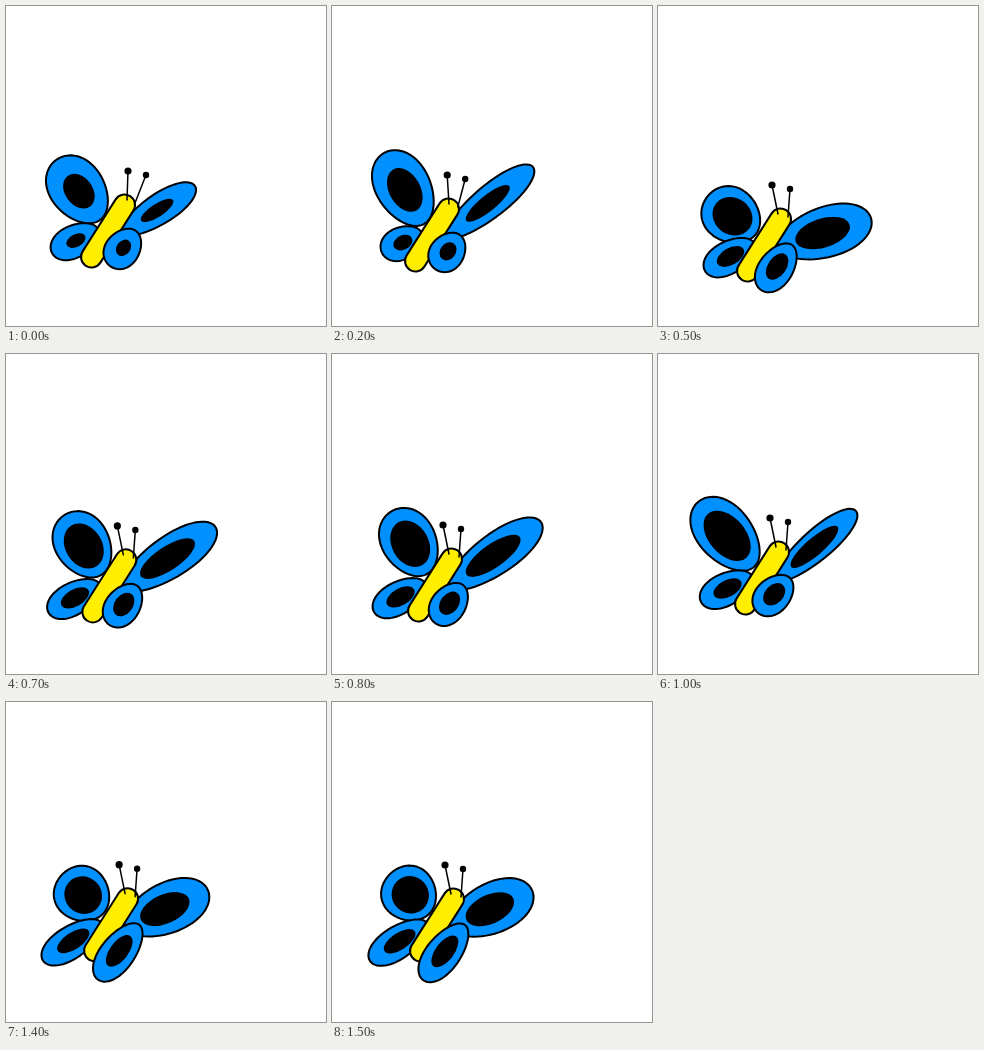
An HTML page with a canvas for the animation above (1.6 s loop, 320 by 320 pixels).

```html
<!DOCTYPE html>
<html>
<head>
<meta charset="utf-8">
<style>
  html, body { margin: 0; height: 100%; overflow: hidden; background: #fff; }
  canvas { display: block; }
</style>
</head>
<body>
<canvas id="stage" width="320" height="320"></canvas>
<script>
const ctx = document.getElementById('stage').getContext('2d');
const BLUE = '#0090ff', YELLOW = '#ffee00', BLACK = '#000';
const TICK = 100, TICKS = 16;

// Key poses: tick, body centre, wing tips (upper left, upper right,
// lower left, lower right), half width of the upper right wing
const POSES = [
  [0, 102, 225, 50, 154, 189, 180, 46, 247, 104, 260, 15],
  [2, 100, 229, 52, 147, 201, 161, 50, 247, 103, 263, 16],
  [5, 106, 239, 49, 191, 213, 212, 47, 265, 103, 284, 25],
  [8, 103, 231, 60, 157, 209, 168, 42, 258, 103, 269, 20],
  [10, 104, 224, 40, 148, 198, 157, 43, 248, 99, 258, 15],
  [12, 106, 220, 37, 181, 217, 188, 29, 256, 97, 273, 25],
  [15, 105, 223, 58, 172, 200, 188, 38, 259, 91, 278, 25],
];

function poseAt(tick) {
  const next = Math.max(1, POSES.findIndex(pose => pose[0] >= tick));
  const from = POSES[next - 1], to = POSES[next];
  const u = (tick - from[0]) / (to[0] - from[0]);
  const eased = 1 - (1 - u) ** 2;
  return from.map((v, i) => v + (to[i] - v) * eased);
}

function stroke(width, color = BLACK) {
  ctx.lineWidth = width;
  ctx.strokeStyle = color;
  ctx.stroke();
}

function segment(x0, y0, x1, y1) {
  ctx.beginPath();
  ctx.moveTo(x0, y0);
  ctx.lineTo(x1, y1);
}

function spot(x, y, rx, ry, angle = 0) {
  ctx.beginPath();
  ctx.ellipse(x, y, rx, ry, angle, 0, 2 * Math.PI);
  ctx.fillStyle = BLACK;
  ctx.fill();
}

// Egg from root to tip, slightly narrower at the root
function wing(rootX, rootY, tipX, tipY, halfWidth, spotScale) {
  const dx = tipX - rootX, dy = tipY - rootY, length = Math.hypot(dx, dy);
  ctx.beginPath();
  for (let a = 0; a < 2 * Math.PI; a += .1) {
    const along = (1 - Math.cos(a)) / 2;
    const side = halfWidth * Math.sin(a) * (1 - .1 * Math.cos(a)) / length;
    ctx.lineTo(rootX + dx * along - dy * side, rootY + dy * along + dx * side);
  }
  ctx.closePath();
  ctx.fillStyle = BLUE;
  ctx.fill();
  stroke(2);
  spot(rootX + dx * .48, rootY + dy * .48,
    length / 2 * spotScale, halfWidth * spotScale, Math.atan2(dy, dx));
}

function feeler(baseX, baseY, tipX, tipY, radius) {
  segment(baseX, baseY, tipX, tipY);
  stroke(1.5);
  spot(tipX, tipY, radius, radius);
}

function draw(tick) {
  const [, x, y, ulX, ulY, urX, urY, llX, llY, lrX, lrY, urWidth] = poseAt(tick);
  // Early in the loop the feelers lean right and the spots are smaller
  const lean = Math.max(0, 1 - tick / 5);
  const grow = 1 - .25 * lean;

  ctx.clearRect(0, 0, 320, 320);
  ctx.lineCap = ctx.lineJoin = 'round';
  wing(x - 8, y - 11, ulX, ulY, 27, .68 * grow);
  wing(x - 10, y - 2, llX, llY, 16, .53 * grow);
  wing(x + 14, y + 2, urX, urY, urWidth, .58 * grow);
  segment(x + 16.5, y - 26, x - 16.5, y + 26);
  stroke(23);
  stroke(19, YELLOW);
  wing(x + 28, y, lrX, lrY, 17, .54 * grow);
  feeler(x + 14 + 5 * lean, y - 31, x + 8 + 12 * lean, y - 60, 3.6);
  feeler(x + 24 + 3 * lean, y - 28, x + 26 + 12 * lean, y - 56, 3.2);
}

function loop() {
  draw(Math.floor(performance.now() / TICK) % TICKS);
  requestAnimationFrame(loop);
}
loop();
</script>
</body>
</html>
```
